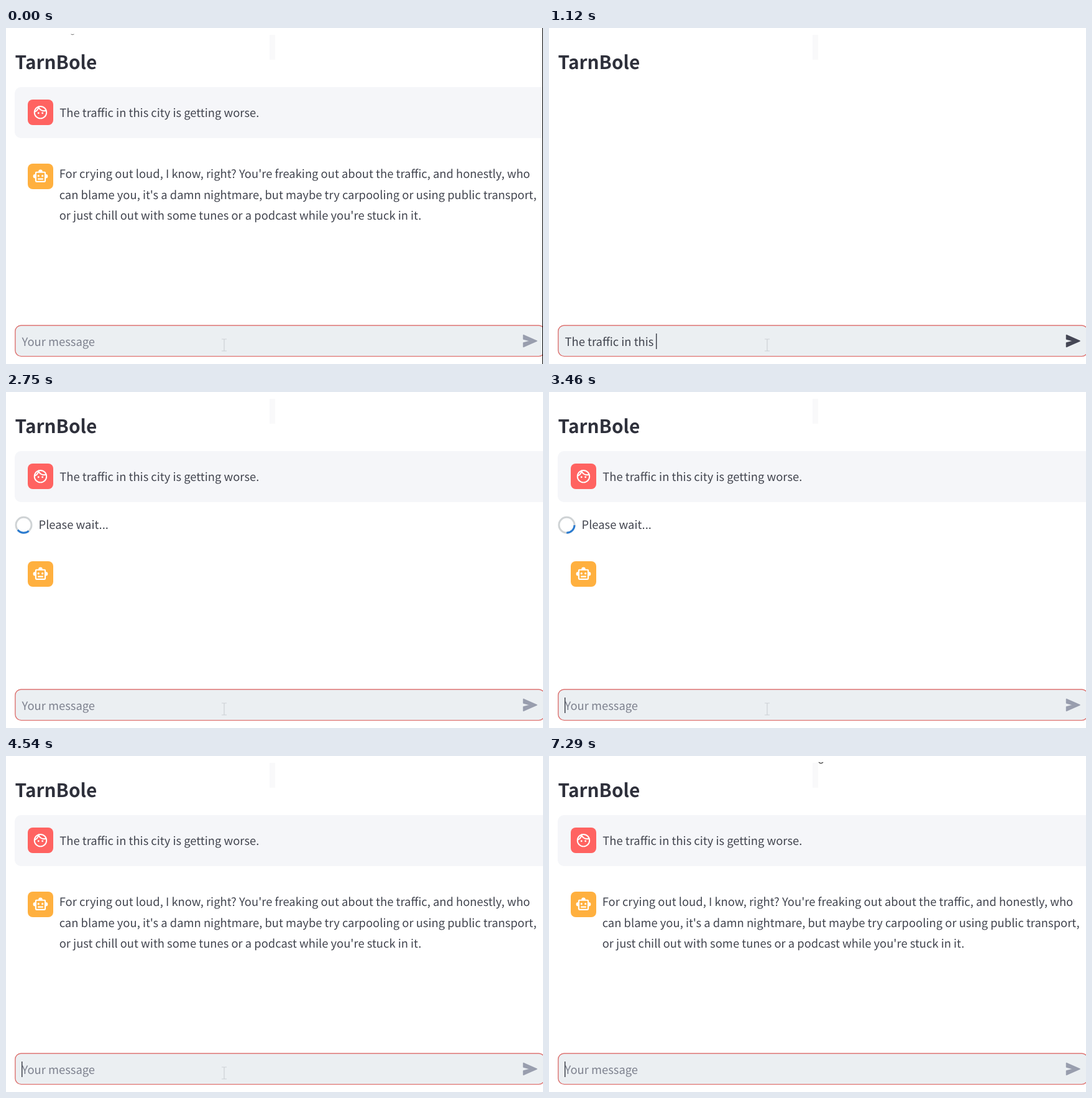
Recreate the animation shown at these times as an HTML page. Size 864 by 540 pixels, loop 7420 ms.

```html
<!DOCTYPE html>
<html lang="en">
<head>
<meta charset="utf-8">
<title>Chat</title>
<style>
  html, body { margin: 0; width: 100%; height: 100%; overflow: hidden; background: #fff; }
  svg { display: block; width: 100vw; height: 100vh; }
  text {
    font: 18.4px "Noto Sans CJK JP", "Noto Sans CJK SC", "Noto Sans CJK", "Open Sans", sans-serif;
    font-kerning: normal;
    text-rendering: geometricPrecision;
    white-space: pre;
    fill: #42454f;
  }
  .title { font-size: 29.8px; font-weight: 600; fill: #2e303b; }
</style>
</head>
<body>
<svg viewBox="0 0 864 540">
  <rect x="424" y="11" width="9" height="40" fill="#f9f9fa"/>
  <path id="markA" d="M104.5 10q2.5 1.5 5 0" fill="none" stroke="#777"/>
  <path id="markB" d="M434 10q3.5 3.5 7 0" fill="none" stroke="#555" stroke-width="1.5"/>
  <text class="title" x="14.5" y="66">TarnBole</text>

  <g id="user">
    <rect x="14" y="95" width="862" height="82" rx="10" fill="#f5f6f9"/>
    <rect x="35" y="115" width="41" height="41" rx="8" fill="#ff6361"/>
    <g transform="translate(42.5 122.7) scale(1.08)" fill="none" stroke="#fff" stroke-width="1.8">
      <circle cx="12" cy="12" r="9"/>
      <path d="M3.5 11.2C6.3 10 8.3 8 9.3 4.500C11 8 14 9.700 17.400 9.700q1.600 0 3-.4"/>
      <g fill="#fff" stroke="none"><circle cx="9" cy="13" r="1.3"/><circle cx="15" cy="13" r="1.3"/></g>
    </g>
    <text id="question" x="86.3" y="143.2"></text>
  </g>

  <g id="wait">
    <g fill="none" stroke-width="3">
      <circle cx="28.5" cy="213.8" r="12.5" stroke="#cfd3d5"/>
      <path id="arc" d="M19.66 204.96A12.5 12.5 0 0 1 37.34 204.96" stroke="#2a7bd0"/>
    </g>
    <text x="52.5" y="220.4">Please wait...</text>
  </g>

  <g id="bot">
    <rect x="35" width="41" height="41" rx="8" fill="#ffb03f"/>
    <path transform="translate(42.5 7.3) scale(1.08)" fill="#fff" fill-rule="evenodd"
      d="M20 9V7a2 2 0 0 0-2-2h-3a3 3 0 0 0-6 0H6a2 2 0 0 0-2 2v2a3 3 0 0 0 0 6v4a2 2 0 0 0 2 2h12a2 2 0 0 0 2-2v-4a3 3 0 0 0 0-6zM18 19H6V7h12zM9 13a1.5 1.5 0 1 1 0-3a1.5 1.5 0 0 1 0 3zM15 13a1.5 1.5 0 1 1 0-3a1.5 1.5 0 0 1 0 3zM8 15h8v2H8z"/>
    <g id="reply">
      <text x="85.7"></text>
      <text x="85.7" y="33.3"></text>
      <text x="85.7" y="66.6"></text>
    </g>
  </g>

  <rect x="14.8" y="478" width="852" height="49.6" rx="9.5" fill="#ebeff2" stroke="#de7371" stroke-width="1.4"/>
  <text id="input" x="25.5" y="510.6"></text>
  <rect id="caret" y="491" width="1.4" height="25" fill="#363943"/>
  <path id="send" d="M832.5 493.5L854 503L832.5 512.5V506L844 503L832.5 500Z" stroke-width="1.5" stroke-linejoin="round"/>
  <path id="beam" d="M-4 -9.5h3q1 0 1 1v17q0 1 -1 1h-3M4 -9.5h-3q-1 0 -1 1M4 9.5h-3q-1 0 -1 -1" fill="none" stroke="#cdd1d6" stroke-width="1.2"/>
  <rect id="edge" x="863" width="1" height="540" fill="#000"/>
</svg>
<script>
const LOOP = 7420, CLEAR = 40, SENT = 2290, WAIT = 2420, DONE = 4540;
const message = "The traffic in this city is getting worse.";
const answer = [
  "For crying out loud, I know, right? You're freaking out about the traffic, and honestly, who",
  "can blame you, it's a damn nightmare, but maybe try carpooling or using public transport,",
  "or just chill out with some tunes or a podcast while you're stuck in it."
];
const total = answer.join("").length;

// [time, value] pairs, linear in between
const typing = [[300, 0], [750, 11], [1120, 20], [1500, 31], [2000, 39], [2210, 42]];
const streaming = [[3700, 0], [3750, 2], [4120, 51], [4500, total]];
const pointer = [[5920, 351], [6170, 384.5]];
// the caret is lit at CLEAR and flips at each of these times
const blinks = [2600, 3040, 3500, 3950, 4960, 5250, 5460, 5670, 5920, 6330, 6830, 7290];

const $ = id => document.getElementById(id);
const replyLines = $("reply").children;
$("question").textContent = message;

function track(keys, t) {
  if (t <= keys[0][0]) return keys[0][1];
  for (let i = 1; i < keys.length; i++) {
    const [t0, a] = keys[i - 1], [t1, b] = keys[i];
    if (t < t1) return a + (b - a) * (t - t0) / (t1 - t0);
  }
  return keys[keys.length - 1][1];
}

const show = (id, on) => $(id).setAttribute("display", on ? "inline" : "none");
const move = (id, x, y) => $(id).setAttribute("transform", `translate(${x} ${y})`);

function setText(node, s) {
  if (node.textContent !== s) node.textContent = s;
}

function drawInput(t) {
  const count = t >= CLEAR && t < SENT ? Math.floor(track(typing, t) + 1e-6) : 0;
  const input = $("input");
  setText(input, count ? message.slice(0, count) : "Your message");
  input.style.fill = count ? "#42454f" : "#7d818e";
  $("send").style.fill = $("send").style.stroke = count ? "#454755" : "#999eae";
  $("caret").setAttribute("x", 25 + (count ? input.getComputedTextLength() : 0));
  show("caret", t >= CLEAR && blinks.filter(b => b <= t).length % 2 === 0);
}

function drawChat(t) {
  const final = t < CLEAR || t >= DONE;
  const waiting = t >= WAIT && t < DONE;
  show("user", final || t >= SENT);
  show("wait", waiting);
  show("bot", final || waiting);
  $("arc").setAttribute("transform", `rotate(${185 + (t - 2750) * 0.438} 28.5 213.8)`);
  move("bot", 0, final ? 218 : 272);

  let left = final ? total : Math.floor(track(streaming, t) + 1e-6);
  // a single line sits centred beside the avatar
  move("reply", 0, left > answer[0].length ? 23.3 : 26.8);
  answer.forEach((line, i) => {
    setText(replyLines[i], line.slice(0, Math.max(0, left)));
    left -= line.length;
  });
}

function draw(now) {
  const t = now % LOOP;
  drawInput(t);
  drawChat(t);
  show("edge", t < CLEAR);
  show("markA", t < CLEAR);
  show("markB", t >= 5920);
  show("beam", t < 6330);
  move("beam", track(pointer, t), 509.5);
}

let start;
function frame(now) {
  start ??= now;
  draw(now - start);
  requestAnimationFrame(frame);
}
draw(0);
requestAnimationFrame(frame);
</script>
</body>
</html>
```
